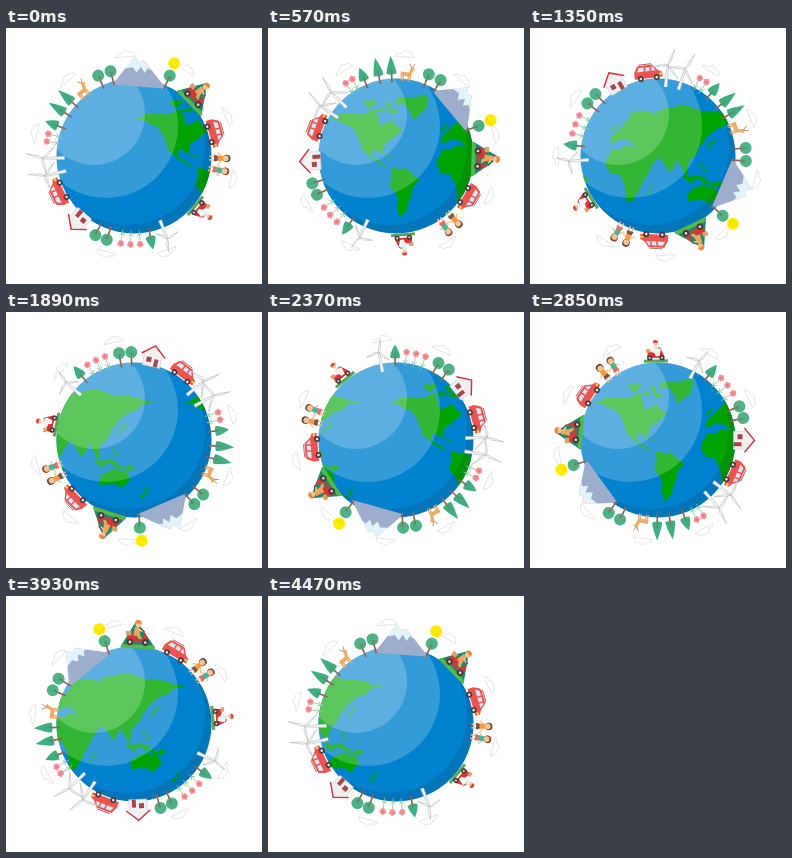
Write an HTML page with a canvas that moves like this. It is 256 by 256 pixels and loops after 4.5 s.

```html
<!DOCTYPE html>
<html lang="en">
<head>
<meta charset="utf-8">
<title>Spinning world</title>
<style>
html, body { margin: 0; width: 100%; height: 100%; overflow: hidden; background: #fff; }
canvas { display: block; width: 100vw; height: 100vh; }
</style>
</head>
<body>
<canvas id="stage"></canvas>
<script>
const canvas = document.getElementById('stage');
const ctx = canvas.getContext('2d');
const LOOP = 4500, STEP = 30, LAST = LOOP / STEP - 1;
const CENTER = 128, RADIUS = 77.5, GROUND = 75.5;
const MAP_WIDTH = 274, MAP_START = 130, MAP_TRAVEL = 532;
const LAND = '#00a300', OCEAN = '#0082ce', RED = '#ef5350', TRUNK = '#8b6250';
const LEAF = '#4fb286', PINE = '#3fae83', SKIN = '#f8c493', DARK = '#4a3b3b';

let seed = 7;
function random() {
  seed = seed * 16807 % 2147483647;
  return seed / 2147483647;
}
const jitter = () => random() - 0.5;

// Splits a shoreline at randomly shifted midpoints until its parts are short.
function roughen([x1, y1], [x2, y2]) {
  const dx = x2 - x1, dy = y2 - y1;
  if (Math.hypot(dx, dy) < 3.5) return [[x2, y2]];
  const shift = jitter() * 0.24;
  const middle = [x1 + dx / 2 - dy * shift, y1 + dy / 2 + dx * shift];
  return [...roughen([x1, y1], middle), ...roughen(middle, [x2, y2])];
}

const land = new Path2D();
function continent(corners) {
  const points = corners.split(' ').map(p => p.split(',').map(Number));
  const coast = points.flatMap((p, i) => roughen(p, points[(i + 1) % points.length]));
  land.addPath(new Path2D('M' + coast.join('L') + 'Z'));
}
function islands(x1, y1, x2, y2, count, size, spread) {
  for (let i = 0; i < count; i++) {
    const part = i / (count - 1);
    const x = x1 + (x2 - x1) * part + jitter() * spread;
    const y = y1 + (y2 - y1) * part + jitter() * spread;
    const island = new Path2D();
    island.ellipse(x, y, size * (0.7 + random() * 0.6), size * 0.5, jitter() * 2, 0, Math.PI * 2);
    land.addPath(island);
  }
}
function buildMap() {
  // The Americas and Greenland
  continent('0,91 22,85 46,84 50,98 62,91 72,101 54,117 52,124 43,121 42,128 56,139 33,124 22,99');
  continent('61,140 76,141 90,152 78,175 69,191 67,168 60,154');
  continent('76,78 66,70 98,67 97,79 83,92');
  // Africa, Eurasia and Australia
  continent('113,121 129,117 141,121 153,138 141,160 132,174 126,172 121,147 111,146 107,138');
  continent('110,115 124,97 134,83 176,79 243,90 226,98 206,112 197,126 189,136 187,148 178,132 170,144 159,130 149,138 135,118 130,113 120,112');
  continent('188,166 204,156 211,161 213,155 219,168 211,177 203,172 190,174');
  islands(33, 80, 64, 78, 9, 4, 11);
  islands(50, 125, 60, 129, 3, 2, 1);
  islands(112, 103, 116, 98, 3, 2.2, 1);
  islands(209, 120, 215, 112, 4, 2, 1);
  islands(185, 149, 220, 156, 9, 3.6, 6);
  islands(202, 136, 205, 142, 3, 2, 1);
  islands(231, 185, 236, 177, 4, 2, 0);
  islands(150, 164, 152, 157, 3, 1.8, 0);
}

function fill(path, color) {
  ctx.fillStyle = color;
  ctx.fill(new Path2D(path));
}
function stroke(path, color, width) {
  ctx.strokeStyle = color;
  ctx.lineWidth = width;
  ctx.stroke(new Path2D(path));
}
function disc(x, y, r, color) {
  ctx.fillStyle = color;
  ctx.beginPath();
  ctx.arc(x, y, r, 0, Math.PI * 2);
  ctx.fill();
}
function box(x, y, w, h, color) {
  ctx.fillStyle = color;
  ctx.fillRect(x, y, w, h);
}
function scaled(y, scale, draw) {
  ctx.save();
  ctx.translate(0, y);
  ctx.scale(scale, scale);
  draw();
  ctx.restore();
}

// Items are drawn upright, standing on y = 0.
function mountain() {
  fill('M-27 6 L-7 -24 L-2 -18 L2 -21 L27 6Z', '#9caecb');
  fill('M-16 -11 L-7 -24 L-2 -18 L2 -21 L11 -11 L7 -13 L4 -8 L0 -14 L-4 -8 L-8 -13Z', '#e2f4fa');
}
function roundTree() {
  stroke('M0 2 V-12', TRUNK, 1.6);
  disc(0, -12.5, 6, LEAF);
  stroke('M0 -5 V-12 M0 -9 l2 -2', TRUNK, 0.8);
}
function pine(height) {
  stroke('M0 2 V-9', TRUNK, 1.6);
  fill(`M0 ${-height} Q5 -12 5 -7 Q0 -5 -5 -7 Q-5 -12 0 ${-height}Z`, PINE);
  stroke(`M0 -5 V${-height * 0.5}`, TRUNK, 0.7);
}
function flower() {
  stroke('M0 1 V-11 M-2.5 -5 L0 -2 L2.5 -5', '#8ac99c', 0.8);
  for (let a = 0; a < 6; a += Math.PI * 0.4) {
    disc(Math.sin(a) * 1.9, -13 - Math.cos(a) * 1.9, 1.6, '#f3949a');
  }
  disc(0, -13, 1.3, '#ec777c');
}
function car() {
  fill('M-14 -3 V-9 L-11 -15 Q-10 -16 -8 -16 H5 L10 -10 L14 -8 V-3Z', RED);
  fill('M-11 -10 L-9 -14 H-4 V-10Z M-2.5 -10 V-14 H2 V-10Z M3.5 -10 V-14 H5 L8 -10Z', '#cfeaf5');
  stroke('M-9 -17 H4', '#a94b4b', 0.8);
  box(11, -7, 3, 2, '#ffd54f');
  for (const x of [-8, 8]) {
    disc(x, -3, 3, DARK);
    disc(x, -3, 1.3, '#e8e8e8');
  }
}
function kid(shirt, bottoms, hair) {
  scaled(0, 1.15, () => {
    stroke('M-1.5 0 V-6 M1.5 0 V-6', SKIN, 1.3);
    fill('M-3 -4 L-2 -8 H2 L3 -4Z', bottoms);
    stroke('M-2 -10 L-5 -7 M2 -10 L5 -8', SKIN, 1.3);
    box(-2.2, -12, 4.4, 5, shirt);
    disc(0, -15, 3.3, hair);
    disc(0, -14.2, 2.5, SKIN);
  });
}
function scooter(shirt, cap) {
  fill('M-10 -4 L-9 -10 H-2 L0 -5 H4 L6 -13 L9 -6 V-3 H-9Z', '#dc3434');
  stroke('M6 -13 L3 -15', DARK, 1);
  for (const x of [-7, 7]) {
    disc(x, -3, 3, DARK);
    disc(x, -3, 1.2, '#ddd');
  }
  box(-11, -13, 5, 4, '#d7a46a');
  fill('M-4 -9 L-3 -17 H1 L2 -10 L4 -6 H1 L-1 -9Z', shirt);
  stroke('M0 -15 L4 -13', SKIN, 1.4);
  disc(0, -19.5, 2.7, SKIN);
  fill('M-3 -20 A3 3 0 0 1 3 -20.5 L4 -20Z', cap);
}
function rider() {
  box(-12, -5, 24, 3, '#58a65c');
  scaled(-4, 0.88, () => scooter('#eef3f3', '#d94a3f'));
}
function tent() {
  fill('M-17 -1 L-2 -28 L18 -1Z', '#17896d');
  fill('M-17 0 L-15 -4 H16 L18 0Z', '#55b848');
  scaled(-3, 1.1, () => scooter('#f2a45c', '#e98a3c'));
}
function turbine(height, blade) {
  const mast = `M-1.6 6 L-.7 ${-height} H.7 L1.6 6`;
  fill(mast, '#f8f8f8');
  stroke(mast, '#b8bcc0', 0.6);
  ctx.translate(0, -height);
  ctx.rotate(0.3);
  for (let i = 0; i < 3; i++) {
    const shape = `M0 0 L1.5 -4 L0 ${-blade} L-.7 -3Z`;
    fill(shape, '#fafafa');
    stroke(shape, '#b8bcc0', 0.6);
    ctx.rotate(Math.PI * 2 / 3);
  }
}
function house() {
  fill('M-9 0 V-12 L0 -20 L9 -12 V0Z', '#eef0f2');
  stroke('M-9 -12 V0 H9 V-12', '#c9cdd1', 0.6);
  stroke('M-12 -11 L0 -21 L12 -11', '#cf383a', 1.5);
  box(2, -8, 4, 8, '#a94447');
  box(-6, -9, 5, 5, '#a94447');
}
function deer() {
  stroke('M-4 0 V-7 M-2 0 V-6 M3 0 V-7 M5 0 V-6', '#e3a15e', 1.2);
  fill('M-5 -9 H3 L5 -15 L9 -13 L7 -11 L5 -5 H-5Z', '#edac66');
  stroke('M5 -14 L3 -18 M6 -14 L8 -18', '#b9814f', 0.8);
}
function sun() {
  disc(0, -25.5, 6, '#ffec00');
  stroke('M-3 -24 Q0 -20 4 -25', '#f4d400', 0.8);
}
function cloud() {
  const shape = 'M-10 -24 Q-8 -28 -4 -27 Q-1 -32 3 -29 Q7 -30 10 -24Z';
  fill(shape, '#fff');
  stroke(shape, '#d9dcde', 0.7);
}

function place(angle, draw, ...args) {
  ctx.save();
  ctx.rotate(angle * Math.PI / 180);
  ctx.translate(0, -GROUND);
  draw(...args);
  ctx.restore();
}
function row(first, gap, count, draw, ...args) {
  for (let i = 0; i < count; i++) place(first + gap * i, draw, ...args);
}

function drawGlobe(progress) {
  ctx.save();
  ctx.beginPath();
  ctx.arc(CENTER, CENTER, RADIUS, 0, Math.PI * 2);
  ctx.clip();
  box(0, 0, 256, 256, OCEAN);
  ctx.fillStyle = LAND;
  for (const copy of [0, 1]) {
    ctx.save();
    ctx.translate(MAP_START + copy * MAP_WIDTH - progress * MAP_TRAVEL, 0);
    ctx.fill(land);
    ctx.restore();
  }
  // Shaded crescent along the lower right edge
  ctx.fillStyle = 'rgba(20, 50, 70, .16)';
  ctx.beginPath();
  ctx.rect(0, 0, 256, 256);
  ctx.arc(121, 119, 78, 0, Math.PI * 2);
  ctx.fill('evenodd');
  disc(100, 98, 72, 'rgba(255, 255, 255, .2)');
  disc(88, 86, 51, 'rgba(255, 255, 255, .2)');
  ctx.restore();
}

function drawRing(progress) {
  ctx.save();
  ctx.translate(CENTER, CENTER);
  ctx.rotate(progress * Math.PI * 2);
  row(-77, 36, 6, cloud);
  row(161, 35, 2, cloud);
  place(23.4, sun);
  place(4.5, mountain);
  place(24, roundTree);
  place(46, tent);
  place(74, car);
  place(91.5, kid, '#f59a3d', '#7b5449', '#60453b');
  place(99.5, kid, '#45b69b', '#ea6868', '#8a5038');
  place(129, rider);
  place(158, turbine, 14, 13);
  place(168.5, pine, 20);
  row(176, 6.3, 3, flower);
  row(198, 8, 2, roundTree);
  place(220.7, house);
  place(244.5, car);
  row(257.5, 11, 2, turbine, 16, 17);
  row(279.5, 5, 2, flower);
  place(291.5, pine, 20);
  row(302, 9, 2, pine, 25);
  place(320.8, deer);
  row(336, 8.5, 2, roundTree);
  ctx.restore();
}

function resize() {
  const ratio = devicePixelRatio || 1;
  canvas.width = Math.round(innerWidth * ratio);
  canvas.height = Math.round(innerHeight * ratio);
}

const start = performance.now();
function frame() {
  const time = (performance.now() - start) % LOOP;
  const progress = Math.floor(time / STEP) / LAST;
  ctx.setTransform(canvas.width / 256, 0, 0, canvas.height / 256, 0, 0);
  box(0, 0, 256, 256, '#fff');
  drawGlobe(progress);
  drawRing(progress);
  requestAnimationFrame(frame);
}
addEventListener('resize', resize);
buildMap();
resize();
frame();
</script>
</body>
</html>
```
